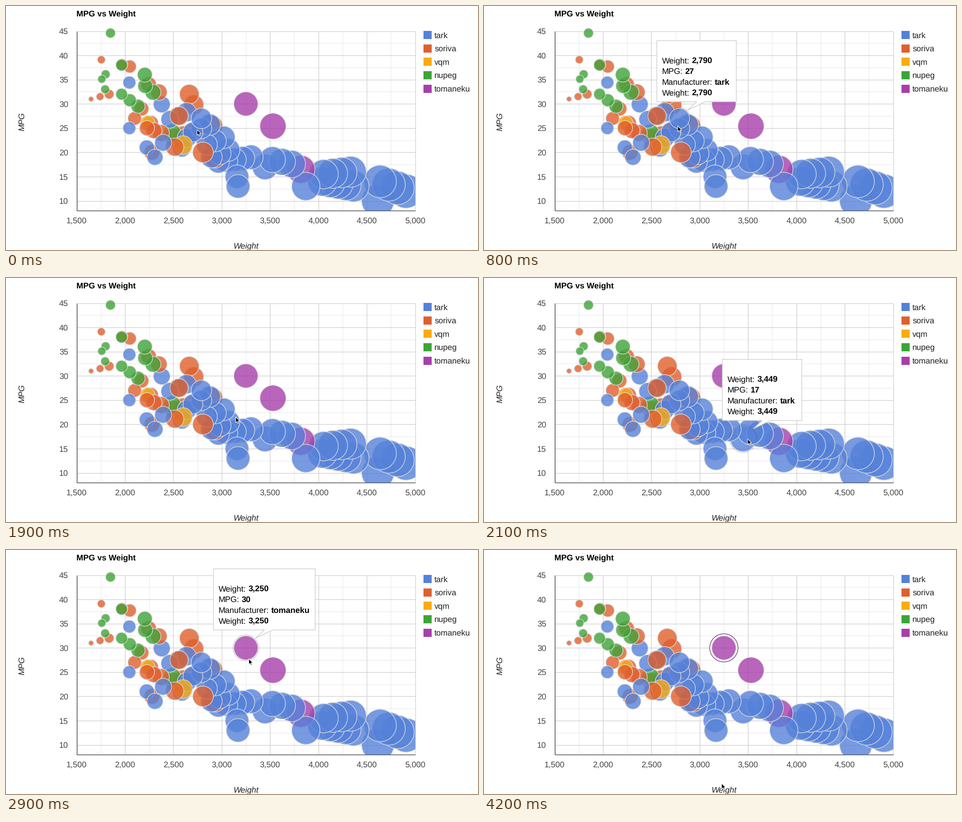
A matplotlib script for the animation above (4300 ms loop, 1039 px wide and 539 px high).

```python
import numpy as np
import matplotlib.pyplot as plt
from itertools import count
from matplotlib.animation import FuncAnimation
from matplotlib.patches import Circle, Polygon, Rectangle

W, H, DPI = 1039, 539, 64
PX = 72 / DPI  # points per pixel
FRAMES, STEP = 43, 100
LEFT, RIGHT, TOP, BOTTOM = 155.5, 900.5, 55.5, 452
SPACING = 88  # weight between neighbours on a strand

BLUE, RED, AMBER, GREEN, PURPLE = (
    "#5581d9", "#e05f2c", "#fbab0e", "#3ea338", "#a63faa")
MAKERS = {"tark": BLUE, "soriva": RED, "vqm": AMBER, "nupeg": GREEN,
          "tomaneku": PURPLE}

plt.rcParams["font.family"] = "Liberation Sans"
plt.rcParams["text.hinting"] = "none"

fig = plt.figure(figsize=(W / DPI, H / DPI), dpi=DPI, facecolor="white")
ax = fig.add_axes([0, 0, 1, 1])
ax.set_xlim(0, W)
ax.set_ylim(H, 0)
ax.axis("off")
plot_area = Rectangle((LEFT, 0), RIGHT - LEFT, BOTTOM, transform=ax.transData)
layer = count()


def px(weight):
    return LEFT + (weight - 1500) * (RIGHT - LEFT) / 3500


def py(mpg):
    return TOP + (45 - mpg) * 75 / 7


def radius(weight):
    return np.sqrt(30 + 0.42 * (weight - 1649))


def label(x, y, s, **kw):
    kw = {"color": "#222222", "fontsize": 18 * PX, "va": "baseline", **kw}
    return ax.text(x, y, s, **kw)


def line(xs, ys, color, width, z):
    ax.plot(xs, ys, color=color, lw=width * PX, zorder=z,
            solid_capstyle="butt")


def vline(x, color, width, z):
    line([x, x], [TOP, BOTTOM], color, width, z)


def hline(y, color, width, z):
    line([LEFT, RIGHT], [y, y], color, width, z)


def draw_axes():
    for w in range(1750, 5000, 500):
        vline(px(w), "#ebebeb", 1.2, 1)
    for m in np.arange(12.5, 45, 5):
        hline(py(m), "#ebebeb", 1.2, 1)
    for w in range(1500, 5001, 500):
        vline(px(w), "#d0d0d0", 1.4, 1.1)
        label(px(w), 480, f"{w:,}", ha="center", color="#444444")
    for m in range(10, 46, 5):
        hline(py(m), "#d0d0d0", 1.4, 1.1)
        label(137, py(m) + 6.5, m, ha="right", color="#444444")
    vline(LEFT, "#404040", 1.4, 1.2)
    hline(BOTTOM, "#404040", 1.4, 1.2)
    label(155, 22.5, "MPG vs Weight", weight="bold", color="black")
    label(528, 535, "Weight", ha="center", style="italic")
    label(40, 255, "MPG", ha="center", style="italic", rotation=90,
          rotation_mode="anchor")


def draw_legend():
    for i, (name, color) in enumerate(MAKERS.items()):
        y = 64 + 29.7 * i
        ax.add_patch(Rectangle((919, y - 9), 18, 18, fc=color, lw=0))
        label(943, y + 6.5, name)


def bubble(color, weight, mpg):
    dot = Circle((px(weight), py(mpg)), radius(weight), fc=(color, 0.8),
                 ec="#dcdcdc", lw=1.4 * PX, zorder=2 + next(layer) / 200)
    ax.add_patch(dot)
    dot.set_clip_path(plot_area)


def strand(color, *knots):
    """Evenly spaced bubbles along a (weight, mpg) path, last one on top."""
    bubble(color, *knots[0])
    for a, b in zip(knots, knots[1:]):
        n = max(1, round(abs(b[0] - a[0]) / SPACING))
        for t in np.arange(1, n + 1) / n:
            bubble(color, *(np.array(a) * (1 - t) + np.array(b) * t))


def draw_heavy():
    strand(BLUE, (4615, 10))
    strand(BLUE, (4906, 12), (4638, 14))
    strand(BLUE, (4363, 13), (4042, 14))
    strand(BLUE, (4335, 16), (4054, 15.5))
    strand(PURPLE, (3820, 16.5))
    strand(BLUE, (3870, 13))
    strand(BLUE, (3449, 17))
    strand(BLUE, (3725, 17.6), (3525, 18.5))
    strand(PURPLE, (3530, 25.4))
    strand(PURPLE, (3250, 30))


def draw_middle():
    strand(BLUE, (3302, 19), (2965, 18))
    strand(BLUE, (3158, 15), (3169, 13))
    strand(RED, (2930, 19), (2900, 25.4))
    strand(RED, (2711, 29.8), (2665, 32))
    strand(RED, (2702, 24), (2506, 23))
    strand(GREEN, (2489, 24))
    strand(BLUE, (2587, 21), (2639, 23))
    for k in range(4):
        w, m = 3070 - 48 * k * k, 20.5 + 2.6 * k
        strand(BLUE, (w, m), (w - 175, m - 1.5))
    strand(BLUE, (2790, 27))
    strand(AMBER, (2600, 21.5))
    strand(RED, (2515, 21.1), (2560, 27.5))
    strand(RED, (2807, 20))


def draw_light():
    strand(RED, (2265, 26), (2279, 20))
    strand(AMBER, (2234, 26))
    strand(RED, (2372, 24), (2228, 25))
    strand(BLUE, (2380, 29.9), (2395, 22))
    strand(BLUE, (2226, 21), (2310, 19))
    strand(RED, (2350, 32.4), (2245, 34))
    strand(GREEN, (2290, 32.4), (2210, 33.7), (2205, 36))
    strand(RED, (2171, 29), (2100, 27))
    strand(GREEN, (2135, 29.5), (1965, 32))
    strand(BLUE, (2045, 25), (2045, 34.4))
    strand(RED, (2050, 37.7), (1968, 38.1))
    strand(GREEN, (1965, 38), (1850, 44.6))
    strand(RED, (1755, 39.1), (1836, 32), (1649, 31))
    strand(GREEN, (1795, 33), (1800, 36.1), (1760, 35.1))


def ring(weight, mpg, gap, **kw):
    return ax.add_patch(Circle((px(weight), py(mpg)), radius(weight) + gap,
                               fill=False, **kw))


def tooltip(weight, mpg, maker, width):
    """Balloon up and right of a bubble, with its hover ring."""
    reach = 0.707 * radius(weight) + 2.4
    tip = np.array([px(weight) + reach, py(mpg) - reach])
    mid, base = tip + (19.5, -18.5)
    x0, x1, y0 = mid - width / 2, mid + width / 2, base - 135
    outline = [(x0, y0), (x1, y0), (x1, base), (mid + 18.5, base), tip,
               (mid, base), (x0, base)]
    parts = [
        ring(weight, mpg, 2, ec=(0, 0, 0, 0.13), lw=2 * PX, zorder=2.9),
        ax.add_patch(Polygon(outline, fc="white", ec="#cccccc", lw=1.4 * PX,
                             joinstyle="round", zorder=5)),
    ]
    rows = [("Weight:", f"{weight:,}"), ("MPG:", f"{mpg:g}"),
            ("Manufacturer:", maker), ("Weight:", f"{weight:,}")]
    for i, (key, value) in enumerate(rows):
        y = y0 + 49.5 + 23.7 * i
        head = label(x0 + 11, y, key, color="black", zorder=6)
        end = head.get_window_extent(fig.canvas.get_renderer()).x1
        parts += [head, label(end + 5, y, value, color="black",
                              weight="bold", zorder=6)]
    return parts


draw_axes()
draw_legend()
draw_heavy()
draw_middle()
draw_light()

# (start ms, end ms, artists)
TIPS = [
    (500, 1800, tooltip(2790, 27, "tark", 175)),
    (2000, 2300, tooltip(3449, 17, "tark", 175)),
    (2300, 2800, tooltip(3525, 18.5, "tark", 175)),
    (2800, 3900, tooltip(3250, 30, "tomaneku", 224)),
]
CLICK = 3300
picked = ring(3250, 30, 4.6, ec="#4f2456", zorder=4)
halo = ring(3250, 30, 2.5, ec="white", lw=3.2 * PX, zorder=3.9)

ARROW = np.array([(0, 0), (0, 12.5), (2.9, 9.9), (4.8, 14.2), (6.9, 13.3),
                  (5, 9.2), (8.9, 9)])
cursor = ax.add_patch(Polygon(ARROW, fc="black", ec="white", lw=1.1 * PX,
                              zorder=9))

# pointer glides: start ms, end ms, destination
HOME = np.array([420.5, 273])
GLIDES = [(0, 1500, (431, 258.5)), (1700, 2100, (580, 355.5)),
          (2300, 3100, (526, 219)), (3700, 4200, (523, 515.5))]


def pointer(t):
    at = HOME
    for start, end, goal in GLIDES:
        u = np.clip((t - start) / (end - start), 0, 1)
        at = at + (np.array(goal) - at) * u * u * (3 - 2 * u)
    return at


def update(i):
    t = i * STEP
    for start, end, parts in TIPS:
        for part in parts:
            part.set_visible(start <= t < end)
    for part in (picked, halo):
        part.set_visible(t >= CLICK)
    picked.set_linewidth((1.8 if t < TIPS[-1][1] else 1.2) * PX)
    cursor.set_xy(ARROW + pointer(t))
    return []


anim = FuncAnimation(fig, update, frames=FRAMES, interval=STEP, repeat=True,
                     repeat_delay=0, blit=False)
plt.show()
```
